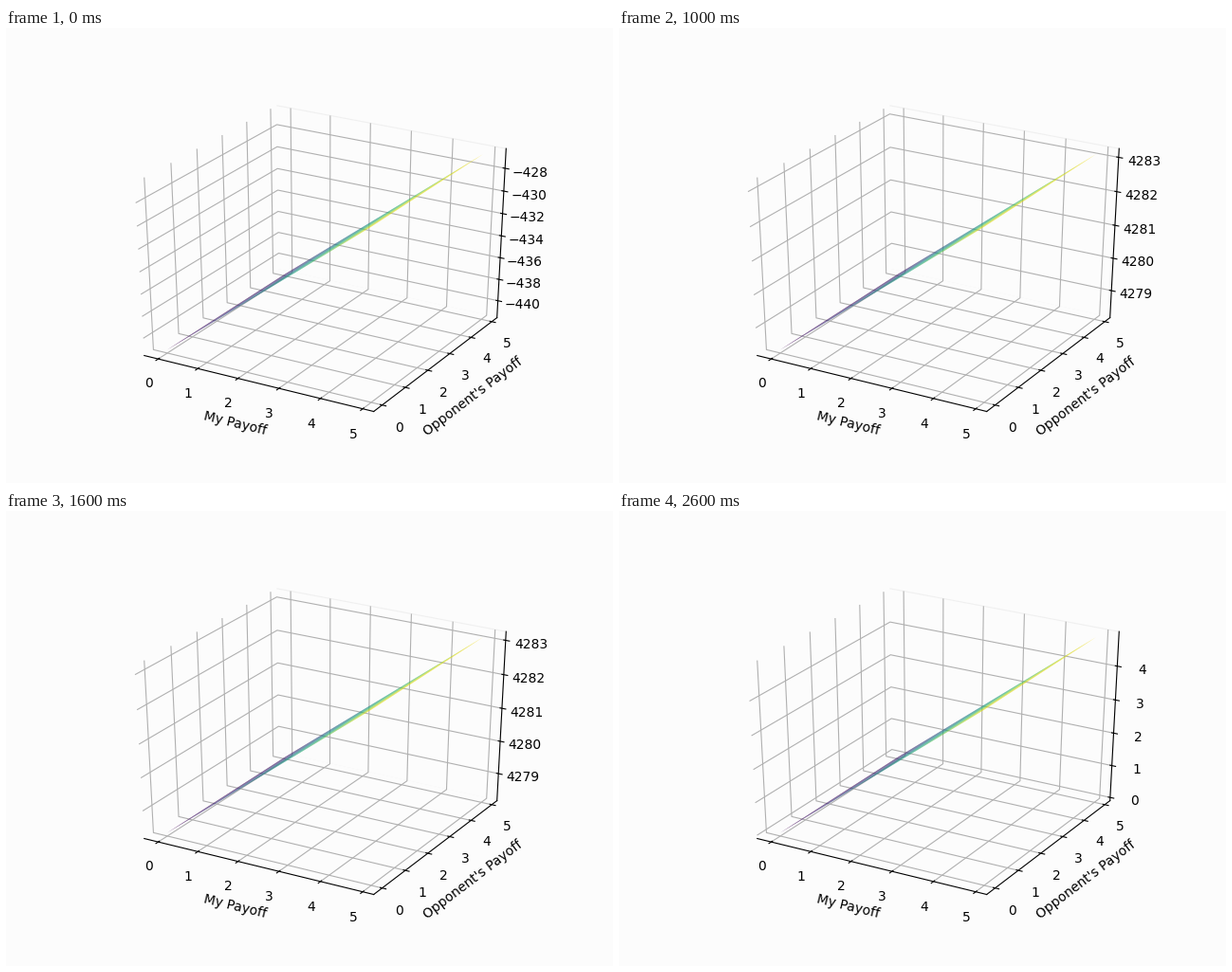
Write a matplotlib script that moves like this. It is 640 by 480 pixels and loops after 3000 ms.

```python
import numpy as np
import matplotlib.pyplot as plt
from matplotlib.animation import FuncAnimation

PAPER = (252 / 255, 252 / 255, 252 / 255, 1)
PANE_EDGE = "#f0f0f0"

# (slope, offset, z ticks) of the utility plane at each step
STEPS = [
    (3, -441.3, np.arange(-440, -427, 2)),
    (1, 4278.25, np.arange(4279, 4284)),
    (1, 0, np.arange(0, 5)),
]


def padded(low, high):
    """Widen a range by 1/48 on each side."""
    pad = (high - low) / 48
    return low - pad, high + pad


fig = plt.figure(figsize=(6.4, 4.8), dpi=100, facecolor=PAPER)
ax = fig.add_subplot(projection="3d", facecolor=PAPER)
ax.apply_aspect = lambda position=None: None  # fill the full rectangle
ax.set_box_aspect((1, 1, 1), zoom=np.sqrt(3) / 1.8294640721620434)
ax.view_init(elev=30, azim=-60)

for axis in (ax.xaxis, ax.yaxis, ax.zaxis):
    axis.set_pane_color(PAPER)
ax.yaxis.pane.set_edgecolor(PANE_EDGE)
ax.yaxis.pane.set_linewidth(0.8)

ax.set_xlabel("My Payoff")
ax.set_ylabel("Opponent's Payoff")

payoff = np.arange(0, 5, 0.1)
mine, theirs = np.meshgrid(payoff, payoff)
margin = 0.05 * payoff[-1]
side = padded(-margin, payoff[-1] + margin)
surfaces = []


def update(step):
    while surfaces:
        surfaces.pop().remove()
    slope, offset, ticks = STEPS[step]
    utility = slope * mine + offset
    surfaces.append(ax.plot_surface(mine, theirs, utility, cmap="viridis"))
    ax.set_xticks(np.arange(6))
    ax.set_yticks(np.arange(6))
    ax.set_zticks(ticks)
    ax.set_xlim(side)
    ax.set_ylim(side)
    ax.set_zlim(padded(utility.min(), utility.max()))
    return surfaces


anim = FuncAnimation(fig, update, frames=len(STEPS), interval=1000, repeat=True)
plt.show()
```
